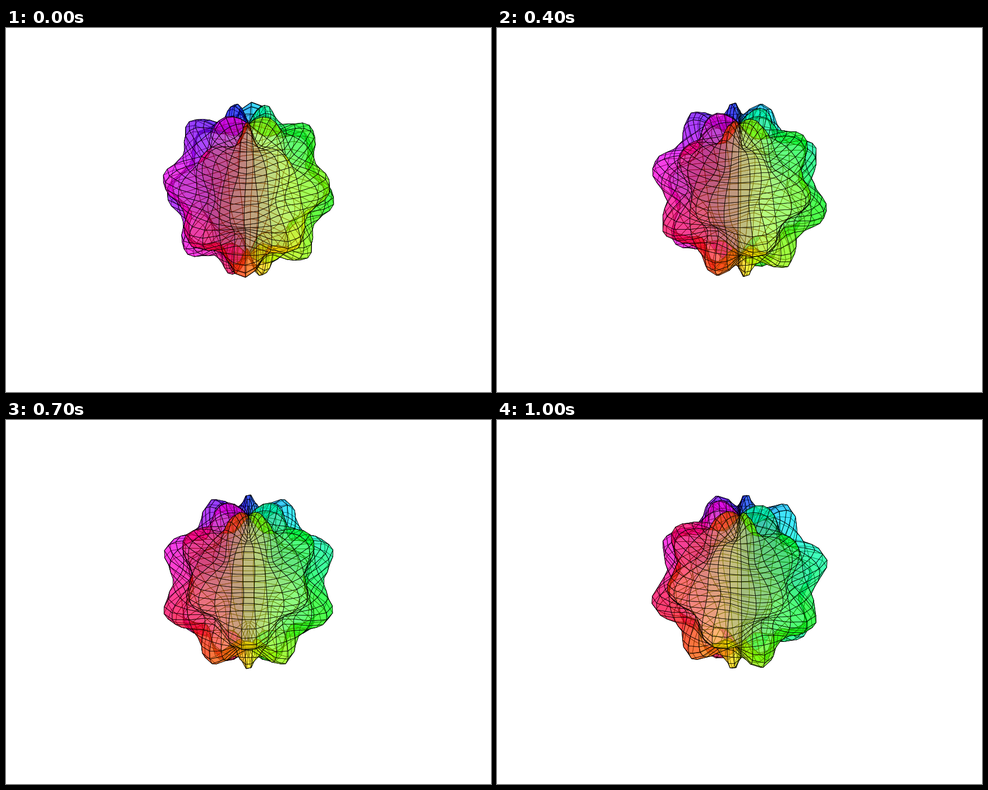
A matplotlib script that plays this animation: 864x648 px, repeating every 1.1 s.

```python
import matplotlib.pyplot as plt
import numpy as np
from matplotlib.animation import FuncAnimation
from matplotlib.collections import PolyCollection

W, H, DPI = 864, 648, 72
FRAMES, INTERVAL = 11, 100
CENTER = np.array([432, 360])
RADIUS, BUMP = 135, 0.2
ELEV = np.radians(30)
AZIM_STEP = 360 / 79
AZIM_START = 5 * AZIM_STEP
ALPHA = 0.5

# Bumpy sphere: rho = 1 + sin(5 theta) sin(6 phi) / 5
theta, phi = np.meshgrid(np.linspace(0, 2 * np.pi, 37), np.linspace(0, np.pi, 37))
rho = RADIUS * (1 + BUMP * np.sin(5 * theta) * np.sin(6 * phi))


def quads(a):
    """Corner values of every grid cell, one row per cell."""
    corners = (a[:-1, :-1], a[:-1, 1:], a[1:, 1:], a[1:, :-1])
    return np.stack([c.ravel() for c in corners], axis=1)


colors = plt.cm.hsv(quads(theta).mean(axis=1) / (2 * np.pi), alpha=ALPHA)


def project(azim):
    """Screen x, screen y and depth towards the viewer."""
    turn = theta - np.radians(azim)
    x = rho * np.sin(phi) * np.sin(turn)
    front = rho * np.sin(phi) * np.cos(turn)
    z = rho * np.cos(phi)
    y = z * np.cos(ELEV) - front * np.sin(ELEV)
    depth = z * np.sin(ELEV) + front * np.cos(ELEV)
    return x, y, depth


fig = plt.figure(figsize=(W / DPI, H / DPI), dpi=DPI, facecolor="white")
ax = fig.add_axes([0, 0, 1, 1])
ax.set(xlim=(0, W), ylim=(0, H))
ax.axis("off")

surface = PolyCollection([], edgecolors="black", linewidths=0.7, joinstyle="round")
ax.add_collection(surface, autolim=False)


def update(i):
    x, y, depth = (quads(a) for a in project(AZIM_START + AZIM_STEP * i))
    order = np.argsort(depth.mean(axis=1))  # far cells first
    surface.set_verts(np.stack([x, y], axis=2)[order] + CENTER)
    surface.set_facecolor(colors[order])
    return [surface]


anim = FuncAnimation(fig, update, frames=FRAMES, interval=INTERVAL,
                     repeat=True, repeat_delay=0)
plt.show()
```
